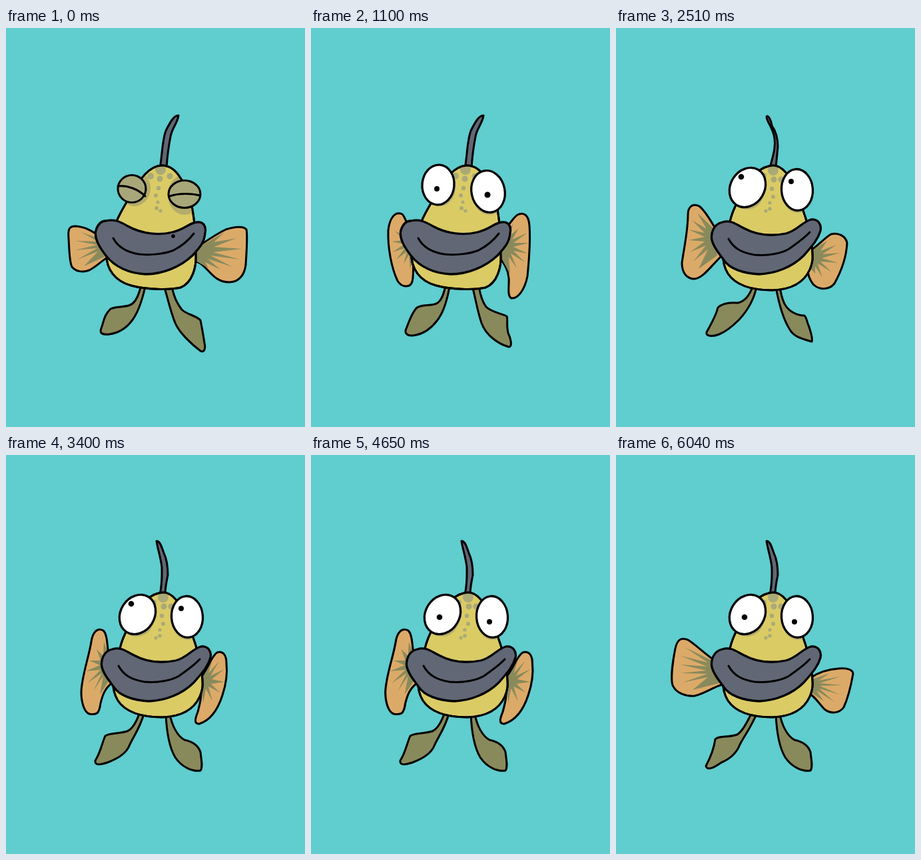
Animation of 449x598 px, one loop 6.07 s. Source, as an HTML page without scripts:

```html
<!DOCTYPE html>
<html lang="en">
<head>
<meta charset="utf-8">
<title>Flapping fish</title>
<style>
@property --k { syntax: "<number>"; inherits: true; initial-value: 0; }
html, body { margin: 0; width: 100%; height: 100%; overflow: hidden; background: #60cdce; }
svg { display: block; width: 100vw; height: 100vh; animation: flap 6.07s infinite; }

/* --k counts key poses, six to a flap */
@keyframes flap {
  0% { --k: 0; animation-timing-function: steps(27); }
  18.12% { --k: 16; animation-timing-function: steps(35); }
  41.35% { --k: 38; animation-timing-function: steps(23); }
  56.01% { --k: 51; animation-timing-function: steps(19); }
  68.2% { --k: 62; animation-timing-function: steps(27); }
  85.99% { --k: 77; animation-timing-function: steps(21); }
  99.5%, 100% { --k: 91; }
}
@keyframes shut { 0% { opacity: 1; } 2.4%, 100% { opacity: 0; } }
@keyframes open { 0% { opacity: 0; } 2.4%, 100% { opacity: 1; } }
@keyframes gaze { 0%, 62% { transform: none; } 33% { transform: translate(-5px, -20px); } }

/* visible while the phase lies near --c */
.pose, .face { opacity: clamp(0, (cos((var(--k) - var(--c)) * 60deg) - var(--w)) * 9999, 1); }
.pose { --w: .866; }
.face { --w: 0; }
.l, .r { transform: scaleX(calc(1 + var(--s) * sin((var(--k) - var(--c)) * 60deg))); }
.l { transform-origin: 152px 330px; }
.r { transform-origin: 290px 340px; }

path, ellipse { stroke: #000; stroke-width: 3; stroke-linejoin: round; stroke-linecap: round; }
.fin { fill: #dcaa68; }
.ray { fill: #898a5c; stroke: none; }
.foot { fill: #898a5c; }
.crest, .lips { fill: #616774; }
.lips, .open ellipse { stroke-width: 3.3; }
.body { fill: #dacb65; }
.body, .rim { stroke-width: 3.8; }
.line, .rim { fill: none; }
.spots { fill: #aaa977; }
.shade { fill: #b5ac6b; stroke: none; }
.open { fill: #fff; animation: open 6.07s step-end infinite; }
.shut { fill: #a8a77a; animation: shut 6.07s step-end infinite; }
.pupils { fill: #000; animation: gaze 6.07s step-end infinite; }
.dot { fill: #000; }
use.body path, use.rim path { stroke-width: inherit; }
</style>
</head>
<body>
<svg viewBox="0 0 449 598" preserveAspectRatio="none">
<defs>
  <path id="bodyA" d="M234 206C214 207 202 226 190 247C175 270 160 295 151 335C149 362 165 380 188 386C210 392 245 393 262 389C280 382 286 358 285 340C285 300 282 250 262 225C255 213 246 206 234 206Z"/>
  <path id="bodyB" d="M236 206C216 207 205 222 195 240C183 258 173 275 169 300C160 335 157 350 168 368C180 386 205 393 235 393C262 392 282 382 291 362C296 350 296 345 294 325C290 295 280 270 270 245C262 222 250 206 236 206Z"/>
  <clipPath id="clipA"><use href="#bodyA"/></clipPath>
  <clipPath id="clipB"><use href="#bodyB"/></clipPath>
  <path id="crestA" d="M231 210C235 190 234 170 240 154C246 142 252 131 259 131C258 142 249 150 247 163C244 178 242 195 241 210"/>
  <path id="crestB" d="M231 210C235 190 234 180 234 168C232 152 228 142 226 129C231 128 234 138 237 147C241 155 243 168 243 180C241 190 239 198 239 210"/>
  <g id="feetA">
    <path d="M203 386C199 400 196 408 190 413C182 420 165 416 157 421C147 430 147 440 143 450C140 458 145 460 155 459C170 457 180 450 188 440C198 428 204 410 209 388"/>
    <path d="M237 386C243 405 247 425 254 442C261 458 280 475 292 484C298 487 300 480 298 472C296 458 294 448 292 438C284 430 272 430 264 422C256 412 251 400 249 386"/>
  </g>
  <path id="footB" d="M240 388C241 412 244 436 254 453C264 468 280 475 292 473C296 468 293 455 292 445C288 434 278 429 268 427C257 421 249 405 246 388"/>
  <g id="lids">
    <ellipse cx="189" cy="241" rx="21" ry="20.5"/>
    <ellipse cx="268" cy="249" rx="24" ry="20.5"/>
    <path class="line" d="M168 237C182 235 199 242 209 252M246 252C260 247 280 248 291 251"/>
  </g>
</defs>

<g class="pose" style="--c:0;--s:.1">
  <use class="crest" href="#crestA"/>
  <use class="foot" href="#feetA"/>
  <g class="l">
    <path class="fin" d="M150 318C133 307 122 298 104 297C94 297 93 303 94 315C95 332 95 350 99 358C105 365 115 367 125 363C137 357 144 348 154 343"/>
    <path class="ray" d="M152 320L113 306L138 320L104 319L137 325L103 333L137 330L107 347L138 335L117 357L152 341Z"/>
  </g>
  <g class="r">
    <path class="fin" d="M283 331C300 320 315 309 330 302C345 297 357 297 361 302C363 310 361 340 360 355C358 372 348 381 335 381C318 381 310 370 302 362C295 355 290 350 283 350"/>
    <path class="ray" d="M285 331L328 306L312 321L346 315L312 328L354 331L311 336L352 347L307 341L340 358L303 346L322 362L299 351L304 360L285 349Z"/>
  </g>
</g>

<g class="pose" style="--c:1;--s:-.15">
  <use class="crest" href="#crestB"/>
  <path class="foot" d="M203 388C197 400 190 414 182 419C168 424 155 420 149 426C147 440 141 455 135 466C137 474 148 468 158 461C170 456 181 447 186 434C192 422 203 408 211 388"/>
  <use class="foot" href="#footB"/>
  <g class="l">
    <path class="fin" d="M148 308C130 295 118 283 108 277C97 273 92 277 89 290C85 310 82 335 85 345C90 357 105 362 118 361C135 357 145 348 160 344"/>
    <path class="ray" d="M148 310L103 288L138 311L97 301L137 317L96 314L136 323L97 327L137 328L100 341L138 333L115 352L155 342Z"/>
  </g>
  <g class="r">
    <path class="fin" d="M292 334C305 325 320 321 335 320C348 319 356 322 356 328C353 345 348 365 342 378C335 388 322 388 313 381C303 370 297 360 290 358"/>
    <path class="ray" d="M292 337L321 327L304 338L337 332L306 342L340 345L306 346L336 359L305 350L328 370L301 353L312 369L292 355Z"/>
  </g>
</g>

<g class="pose" style="--c:2;--s:-.2">
  <path class="crest" d="M231 210C236 190 240 180 238 165C236 150 227 142 226 133C228 129 233 138 234 146C239 153 243 165 243 178C242 190 241 198 240 210"/>
  <path class="foot" d="M205 388C200 402 192 410 183 412C172 411 160 412 153 419C150 432 143 443 136 456C134 462 145 463 155 459C165 455 177 445 185 437C196 425 207 408 211 388"/>
  <path class="foot" d="M240 388C244 410 250 435 261 452C267 463 280 466 294 470C296 465 292 455 290 448C286 440 287 435 283 431C272 431 260 425 254 415C249 407 248 398 246 388"/>
  <g class="l">
    <path class="fin" d="M150 302C142 288 133 273 125 267C115 262 108 268 108 280C108 305 102 330 99 352C99 368 107 376 118 376C130 375 140 360 159 341"/>
    <path class="ray" d="M148 302L122 277L136 301L114 288L133 307L109 302L133 313L109 318L133 320L111 336L135 326L116 350L138 332L124 361L152 341Z"/>
  </g>
  <g class="r">
    <path class="fin" d="M288 336C303 328 312 315 323 309C334 306 345 312 347 322C346 345 338 365 328 383C320 393 305 393 296 384C290 376 288 370 288 362"/>
    <path class="ray" d="M292 335L317 319L307 334L331 325L310 339L336 337L309 345L334 352L307 350L324 366L303 353L310 374L299 357L299 368L290 358Z"/>
  </g>
</g>

<g class="pose" style="--c:3;--s:-.1">
  <use class="crest" href="#crestB"/>
  <path class="foot" d="M200 388C195 402 189 411 182 414C170 418 156 416 149 421C144 432 142 446 134 458C133 466 142 464 152 461C168 455 181 446 185 436C190 424 201 410 207 388"/>
  <use class="foot" href="#footB"/>
  <g class="l">
    <path class="fin" d="M154 300C152 285 152 268 146 263C136 258 130 267 128 280C124 305 114 330 113 355C113 370 117 385 125 388C136 390 140 388 142 372C145 360 148 350 160 341"/>
    <path class="ray" d="M152 294L147 280L146 301L136 291L142 308L125 308L141 315L120 324L142 322L122 342L144 327L131 354L146 331L141 359L154 339Z"/>
  </g>
  <g class="r">
    <path class="fin" d="M291 335C303 325 307 302 317 296C326 293 331 300 331 312C333 330 330 345 325 360C318 382 306 398 290 403C282 403 284 395 288 385C292 370 294 360 293 345"/>
    <path class="ray" d="M296 332L309 310L304 327L320 309L307 331L328 321L309 336L328 340L308 343L321 356L304 347L310 369L300 350L296 372L294 348Z"/>
  </g>
</g>

<g class="pose" style="--c:4;--s:.1">
  <use class="crest" href="#crestA"/>
  <path class="foot" d="M202 386C199 400 196 408 190 412C181 418 166 413 158 420C149 431 147 442 142 453C141 461 149 462 158 460C173 457 182 448 189 439C199 427 204 410 208 388"/>
  <path class="foot" d="M242 386C247 405 250 425 256 442C263 462 283 474 297 478C303 478 300 465 296 457C293 445 296 438 294 432C285 428 270 425 263 418C257 410 254 400 252 386"/>
  <g class="l">
    <path class="fin" d="M154 303C143 298 143 285 137 279C126 274 118 285 116 303C115 330 121 360 130 379C136 389 149 390 152 380C155 368 152 355 155 345"/>
    <path class="ray" d="M152 307L135 301L142 313L126 304L139 318L121 320L140 324L122 336L141 330L128 347L144 335L139 354L147 340L149 362L153 343Z"/>
  </g>
  <g class="r">
    <path class="fin" d="M283 305C297 300 302 285 310 280C320 275 327 281 328 296C330 325 327 350 325 372C321 392 311 406 301 405C294 402 298 385 297 375C296 362 291 355 284 345"/>
    <path class="ray" d="M290 307L303 294L299 311L312 300L302 317L325 307L304 322L327 322L304 328L325 338L304 334L321 351L300 338L309 360L297 343L299 369L286 345Z"/>
  </g>
</g>

<g class="pose" style="--c:5;--s:.2">
  <path class="crest" d="M231 210C235 190 234 172 240 153C246 143 251 133 257 131C257 142 250 150 248 163C244 172 243 195 241 210"/>
  <use class="foot" href="#feetA"/>
  <g class="l">
    <path class="fin" d="M154 296C146 295 140 288 133 284C122 280 111 283 110 297C110 315 115 340 118 362C119 377 126 384 137 383C147 381 148 365 157 345"/>
    <path class="ray" d="M152 309L128 303L141 316L121 313L139 322L120 328L139 328L122 341L141 332L128 352L144 336L140 357L153 342Z"/>
  </g>
  <g class="r">
    <path class="fin" d="M283 331C298 322 305 312 313 303C322 292 335 284 344 287C350 291 349 300 347 312C344 340 343 365 339 380C335 393 324 398 315 393C303 385 296 360 284 348"/>
    <path class="ray" d="M285 331L322 301L309 321L333 306L311 327L338 320L312 333L336 337L310 340L335 353L307 345L326 366L303 350L314 377L284 347Z"/>
  </g>
</g>

<g class="face" style="--c:5">
  <use class="body" href="#bodyA"/>
  <g clip-path="url(#clipA)">
    <g class="spots">
      <circle cx="232" cy="212" r="8"/><circle cx="217" cy="222" r="5"/><circle cx="246" cy="222" r="4.5"/>
      <circle cx="231" cy="226" r="4.5"/><circle cx="229" cy="240" r="3.2"/><circle cx="225" cy="251" r="3"/>
      <circle cx="228" cy="261" r="2.5"/><circle cx="226" cy="270" r="3"/><circle cx="232" cy="274" r="2.6"/>
    </g>
    <ellipse class="shade" cx="193" cy="240" rx="24" ry="27"/>
    <ellipse class="shade" cx="268" cy="250" rx="25" ry="30"/>
  </g>
  <use class="rim" href="#bodyA"/>
  <g class="shut"><circle class="dot" cx="202" cy="307" r="2.6"/></g>
  <path class="lips" d="M150 289C165 286 172 291 183 297C205 309 230 311 250 306C268 302 275 292 287 291C297 290 301 298 299 307C298 322 290 330 280 341C262 358 235 369 210 369C185 368 163 358 150 341C140 328 132 315 135 303C138 294 143 289 150 289Z"/>
  <path class="line" d="M161 315C168 328 180 336 200 339C220 341 240 338 252 333C267 325 276 316 282 308"/>
  <g class="open">
    <ellipse cx="191" cy="235" rx="24" ry="30" transform="rotate(5 191 235)"/>
    <ellipse cx="266" cy="245" rx="25" ry="31.5" transform="rotate(-12 266 245)"/>
    <g class="pupils"><circle cx="189" cy="241" r="4"/><circle cx="265" cy="250" r="4.5"/></g>
  </g>
  <g class="shut"><use href="#lids"/><circle class="dot" cx="251" cy="312" r="2.8"/></g>
</g>

<g class="face" style="--c:2">
  <use class="body" href="#bodyB"/>
  <g clip-path="url(#clipB)">
    <g class="spots">
      <circle cx="236" cy="213" r="8"/><circle cx="237" cy="227" r="4.5"/><circle cx="248" cy="227" r="4.5"/>
      <circle cx="222" cy="221" r="4"/><circle cx="234" cy="241" r="3.2"/><circle cx="236" cy="253" r="3"/>
      <circle cx="231" cy="262" r="2.6"/><circle cx="231" cy="271" r="2.8"/><circle cx="225" cy="274" r="2.6"/>
    </g>
    <ellipse class="shade" cx="197" cy="243" rx="26" ry="29"/>
    <ellipse class="shade" cx="273" cy="247" rx="24" ry="30"/>
  </g>
  <use class="rim" href="#bodyB"/>
  <path class="lips" d="M160 291C172 287 180 294 192 300C212 311 235 312 255 308C272 304 280 290 293 287C304 286 309 295 307 304C303 318 293 328 282 341C265 358 240 368 215 369C190 368 170 360 162 348C155 338 147 330 144 318C142 308 146 294 160 291Z"/>
  <path class="line" d="M169 316C177 331 190 337 208 340C230 342 250 337 260 331C272 322 282 316 291 306"/>
  <g class="open">
    <ellipse cx="197.5" cy="239" rx="25.5" ry="31" transform="rotate(32 197.5 239)"/>
    <ellipse cx="272" cy="242.5" rx="23.5" ry="31" transform="rotate(-4 272 242.5)"/>
    <g class="pupils"><circle cx="193" cy="243" r="4.3"/><circle cx="268" cy="250" r="4"/></g>
  </g>
  <g class="shut"><use href="#lids" x="6"/></g>
</g>
</svg>
</body>
</html>
```
